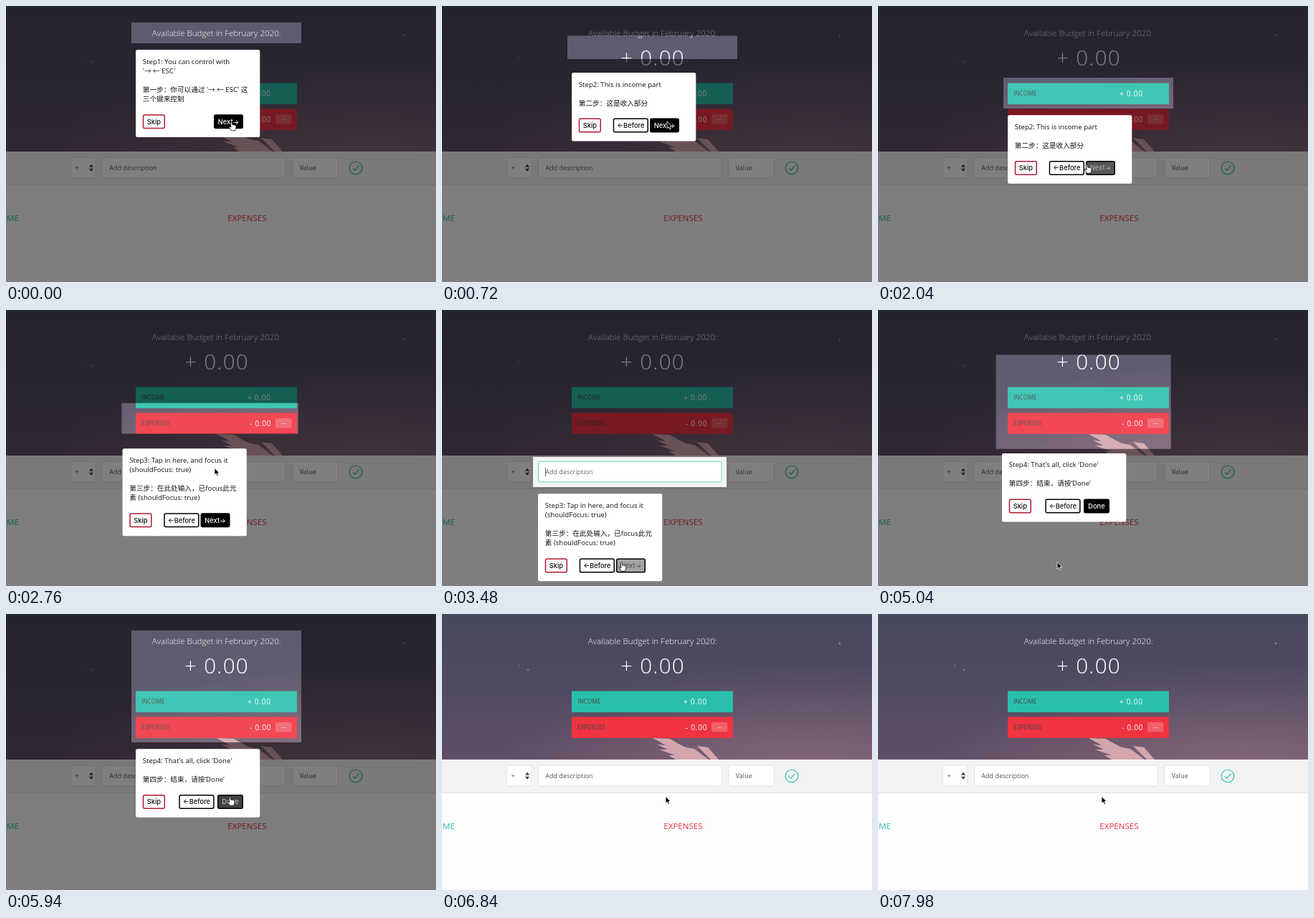
An HTML page that plays this animation: 600 by 385 pixels, repeating every 8000 ms.

```html
<!DOCTYPE html>
<html lang="zh-CN">
<head>
<meta charset="utf-8">
<title>Budget tour</title>
<style>
html, body { margin: 0; width: 100%; height: 100%; overflow: hidden; background: #fdfdfd; }
svg { display: block; width: 600px; height: 385px; }
text { font-family: "Open Sans", "Noto Sans CJK SC", "Noto Sans CJK", sans-serif; white-space: pre; }
.field { fill: #fff; stroke: #dedede; stroke-width: .8; }
.input { font-size: 9px; fill: #555; }
.label { font-size: 8.36px; fill: #444; }
.amount { font-size: 10.3px; letter-spacing: .64px; fill: #fff; }
.tip text { font-size: 9.64px; fill: #111; }
.tip .btn text { font: 500 9.3px Inter, sans-serif; text-anchor: middle; }
.btn rect { fill: #fff; stroke: #000; stroke-width: 1.5; }
</style>
</head>
<body>
<svg viewBox="0 0 600 385">
  <defs>
    <linearGradient id="sky" x2="0" y2="1">
      <stop offset="0" stop-color="#48485c"/>
      <stop offset=".55" stop-color="#504b61"/>
      <stop offset="1" stop-color="#5f4e65"/>
    </linearGradient>
    <radialGradient id="dusk" cx=".85" cy="1.1" r=".75">
      <stop offset="0" stop-color="#a07888" stop-opacity=".6"/>
      <stop offset="1" stop-color="#a07888" stop-opacity="0"/>
    </radialGradient>
  </defs>

  <rect width="600" height="385" fill="#fdfdfd"/>
  <rect width="600" height="203" fill="url(#sky)"/>
  <rect width="600" height="203" fill="url(#dusk)"/>
  <g fill="#a08fa4">
    <circle cx="555" cy="41" r="1.2"/>
    <circle cx="107" cy="72" r=".8"/>
    <circle cx="120" cy="78" r="1"/>
  </g>
  <path fill="#d3a5ad" d="M294 173L318 174L330 181L340 186L352 188L372 203L326 203L316 197L325 197L303 189L315 189L300 182L312 183ZM356 184L371 186L386 203L375 203Z"/>

  <text x="293.7" y="42" text-anchor="middle" font-size="11.57" font-weight="300" fill="#fff">Available Budget in February 2020:</text>
  <text x="294" y="83" text-anchor="middle" font-size="29.6" font-weight="300" letter-spacing="1.29" fill="#fff">+ 0.00</text>
  <rect x="181" y="107.5" width="225" height="29.5" fill="#2abfab"/>
  <text class="label" x="189" y="125.3">INCOME</text>
  <text class="amount" x="337" y="126">+ 0.00</text>
  <rect x="181" y="143.5" width="225" height="29.5" fill="#ef3340"/>
  <text class="label" x="189" y="161.3">EXPENSES</text>
  <text class="amount" x="370.3" y="162" text-anchor="end">- 0.00</text>
  <rect x="376" y="151" width="22.5" height="13.5" rx="2" fill="#fff" fill-opacity=".22"/>
  <text x="387.2" y="160" text-anchor="middle" font-size="7.07" fill="#fff">---</text>

  <rect y="203" width="600" height="46.5" fill="#f3f3f3"/>
  <rect y="249" width="600" height="1" fill="#e3e3e3"/>
  <rect class="field" x="90.4" y="211.4" width="34.7" height="28.4" rx="2.5"/>
  <text class="input" x="96.5" y="229.3">+</text>
  <path fill="#444" d="M116 224.8L119 220.5L122 224.8ZM116 226.8L119 231L122 226.8Z"/>
  <rect class="field" id="desc" x="134.4" y="211.4" width="255.6" height="28.4" rx="2.5"/>
  <text class="input" x="144.3" y="229.3">Add description</text>
  <rect id="caret" x="144" y="220" width=".8" height="12" fill="#222"/>
  <rect class="field" x="399.9" y="211.4" width="63.3" height="28.4" rx="2.5"/>
  <text class="input" x="409.7" y="229.3">Value</text>
  <g fill="none" stroke="#2abfab" stroke-width="1.1">
    <circle cx="488" cy="226" r="8.8"/>
    <path d="M483.8 226.3L486.8 229.2L492.4 222.8"/>
  </g>

  <text x="18" y="300.3" text-anchor="end" font-size="11.57" fill="#2abfab">INCOME</text>
  <text x="309.3" y="300.3" font-size="11.57" fill="#ef3340">EXPENSES</text>

  <g id="tour">
    <path id="dim" fill-opacity=".5" fill-rule="evenodd"/>
    <rect id="glow" fill="#fff" fill-opacity=".1"/>
    <g id="tips"></g>
  </g>

  <g id="cursor" stroke-linejoin="round">
    <path id="arrow" fill="#000" stroke="#fff" stroke-width=".8" d="M0 0V9.6L2.2 7.6L3.7 11L5.4 10.2L4 7H7Z"/>
    <path id="hand" fill="#fff" stroke="#000" stroke-width=".8" d="M-1 1.2Q0 -.6 1 1.2L1.8 4.8Q2.8 3.9 3.7 5Q4.8 4.3 5.5 5.5Q6.9 5.2 7.1 6.8L6.9 9.3L5.8 12.8H.6L-2.6 8.6Q-3.4 7.2 -2.2 6.9L0 8.2Z"/>
  </g>
</svg>
<script>
const LOOP = 8000, MOVE = 210, FADE = 300;
const $ = id => document.getElementById(id);

// hole and tip boxes; start: when the step opens; over/press: pointer on the main button
const steps = [
  { start: -999, over: 0, press: 500, hole: [175, 23, 237, 29], tip: [181, 61], h: 122, main: 'Next→',
    lines: ['Step1: You can control with', "'→ ← ESC'", '', "第一步：你可以通过 '→ ← ESC' 这", '三个键来控制'] },
  { start: 684, over: 1975, press: 2520, hole: [175, 100, 237, 43], tip: [181, 152.3], h: 95.5, main: 'Next→',
    lines: ['Step2: This is income part', '', '第二步：这是收入部分'] },
  { start: 2720, over: 3370, press: 4760, hole: [127, 205, 270, 42], tip: [134, 256.3], h: 122, main: 'Next→',
    lines: ['Step3: Tap in here, and focus it', '(shouldFocus: true)', '', '第三步：在此处输入，已focus此元', '素 (shouldFocus: true)'] },
  { start: 4940, over: 5886, press: 6540, hole: [175, 23, 237, 156], tip: [181, 188.3], h: 95.5, main: 'Done',
    lines: ["Step4: That's all, click 'Done'", '', '第四步：结束，请按‘Done’'] }
];
const CLOSE = 6720, FOCUS = 3000, BLUR = 4760;

// pointer: [from, to, x0, y0, x1, y1]
const trips = [
  [1260, 1990, 314, 161, 291, 220.5],
  [3010, 3400, 291, 220.5, 250, 351.5],
  [5220, 5900, 250, 351.5, 312, 254.5]
];
const handTimes = [[0, 684], [1975, 2730], [3370, 4950], [5886, CLOSE]];

const clamp = v => Math.max(0, Math.min(1, v));
const mix = (a, b, p) => a.map((v, i) => v + (b[i] - v) * p);
const show = (el, on) => el.setAttribute('visibility', on ? 'inherit' : 'hidden');
const attrs = (el, o) => { for (const k in o) el.setAttribute(k, o[k]); };

// cubic-bezier(.25, .1, .25, 1)
function ease(x) {
  x = clamp(x);
  if (x === 0 || x === 1) return x;
  let lo = 0, hi = 1, u = .5;
  for (let i = 0; i < 24; i++) {
    u = (lo + hi) / 2;
    const bx = .75 * u * (1 - u) + u * u * u;
    if (bx < x) lo = u; else hi = u;
  }
  return .3 * u * (1 - u) ** 2 + 3 * u * u * (1 - u) + u ** 3;
}
const smooth = x => { x = clamp(x); return x * x * (3 - 2 * x); };

function button(x, y, w, label, cls, stroke) {
  return `<g class="btn ${cls}"><rect x="${x + .75}" y="${y + .75}" width="${w - 1.5}" height="18.5" rx="2"` +
    (stroke ? ` style="stroke:${stroke}"` : '') +
    `/><text x="${x + w / 2}" y="${y + 13.4}">${label}</text></g>`;
}

$('tips').innerHTML = steps.map((s, i) => {
  const y = s.h - 31.8, last = i === 3;
  return `<g class="tip"><rect width="173.3" height="${s.h}" rx="2.5" fill="#fff"/>` +
    s.lines.map((l, n) => `<text x="9.8" y="${19.6 + n * 13}">${l}</text>`).join('') +
    button(9.7, y, 31.3, 'Skip', '', '#ad1c30') +
    (i ? button(last ? 60.3 : 57.7, y, 49.3, '←Before', '') : '') +
    button(last ? 114 : 109, y, last ? 36 : 41, s.main, 'main') + '</g>';
}).join('');
const tips = [...document.querySelectorAll('.tip')];

function draw(t) {
  let n = 0;
  steps.forEach((s, i) => { if (t >= s.start) n = i; });
  const s = steps[n], prev = steps[Math.max(0, n - 1)];
  const [x, y, w, h] = mix(prev.hole, s.hole, ease((t - s.start) / MOVE));
  const pos = mix(prev.tip, s.tip, ease((t - s.start + 10) / MOVE));

  show($('tour'), t < CLOSE);
  attrs($('dim'), { d: `M0 0H600V385H0ZM${x} ${y}h${w}v${h}h${-w}Z` });
  attrs($('glow'), { x, y, width: w, height: h });
  tips.forEach((el, i) => show(el, i === n));
  attrs(tips[n], { transform: `translate(${pos})` });

  const inv = t >= s.over && t < s.press ? ease((t - s.over) / FADE) : 0;
  const gray = v => `rgb(${[v, v, v].map(c => Math.round(c * 255))})`;
  const main = tips[n].querySelector('.main');
  main.children[0].style.fill = gray(inv);
  main.children[1].style.fill = gray(1 - inv);

  const focus = t >= FOCUS && t < BLUR;
  $('desc').style.stroke = focus ? '#2abfab' : '';
  show($('caret'), focus && (t - FOCUS) % 1000 < 500);

  let at = [314, 161];
  for (const [a, b, x0, y0, x1, y1] of trips)
    if (t >= a) at = mix([x0, y0], [x1, y1], smooth((t - a) / (b - a)));
  const hand = handTimes.some(([a, b]) => t >= a && t < b);
  show($('hand'), hand);
  show($('arrow'), !hand);
  attrs($('cursor'), { transform: `translate(${at})` });
}

function tick() {
  draw(performance.now() % LOOP);
  requestAnimationFrame(tick);
}
tick();
</script>
</body>
</html>
```
